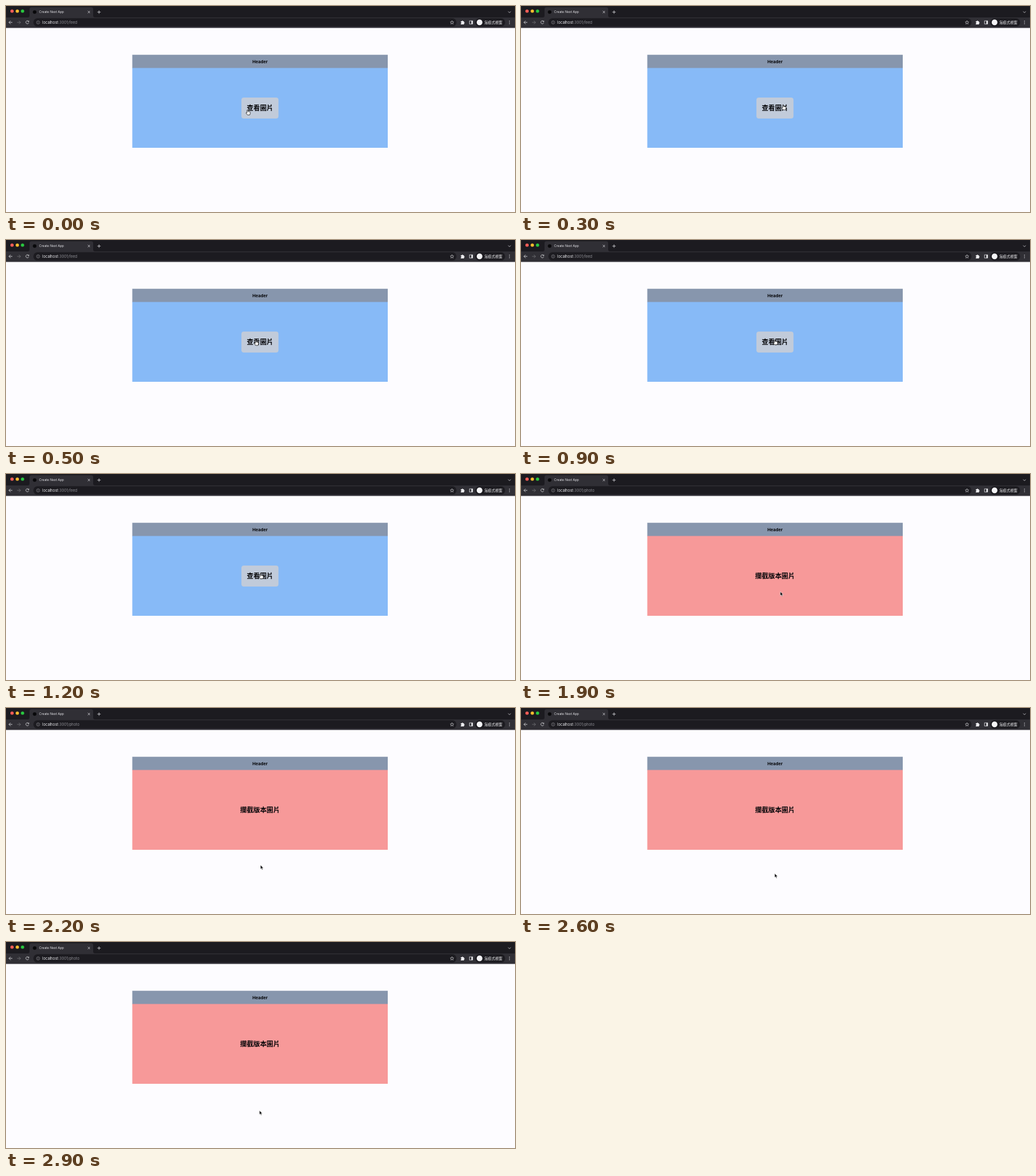
An HTML page that plays this animation: 800 px wide and 324 px high, repeating every 3000 ms.

```html
<!DOCTYPE html>
<html lang="en">
<head>
<meta charset="utf-8">
<title>Feed and photo</title>
<style>
html, body { margin: 0; width: 100%; height: 100%; overflow: hidden; background: #fdfcff; }
svg { display: block; width: 800px; height: 324px; font-family: Inter, "Noto Sans CJK TC", "Noto Sans CJK", sans-serif; }
.line { fill: none; stroke: #d8d8dc; stroke-width: .8; }
.center { text-anchor: middle; font-weight: 700; fill: #050508; }
.title { font-size: 10.4px; font-family: "Noto Sans CJK TC", "Noto Sans CJK", sans-serif; }
</style>
</head>
<body>
<svg viewBox="0 0 800 324">
  <!-- tab strip -->
  <rect width="800" height="18" fill="#1c1b20"/>
  <circle cx="9.5" cy="8" r="2.6" fill="#fb5d57"/>
  <circle cx="17.8" cy="8" r="2.6" fill="#fbbd2e"/>
  <circle cx="26" cy="8" r="2.6" fill="#29c840"/>
  <path d="M34 18q3 0 3-3V5q0-3 3-3h94q3 0 3 3v10q0 3 3 3z" fill="#302f35"/>
  <circle cx="45" cy="9.5" r="2.8" fill="#08080a"/>
  <text x="52" y="11.4" font-size="5" fill="#e6e6ea">Create Next App</text>
  <path class="line" d="M128.6 7.8l3.4 3.4m0-3.4l-3.4 3.4M143.6 9.6h5.2m-2.6-2.6v5.2M789.3 8.6l2 2 2-2"/>

  <!-- toolbar -->
  <rect y="18" width="800" height="16.5" fill="#302f35"/>
  <rect x="43" y="19.3" width="665" height="13" rx="6.5" fill="#1c1b20"/>
  <rect x="737.5" y="19.3" width="47" height="13" rx="6.5" fill="#1c1b20"/>
  <path class="line" d="M10 25.8H4.6m2.6-2.6l-2.6 2.6 2.6 2.6M35.6 24.3a2.4 2.4 0 1 0 .2 2.2m.1-3.4v1.7h-1.8"/>
  <path class="line" d="M17.5 25.8h5.4m-2.6-2.6l2.6 2.6-2.6 2.6" style="stroke:#717176"/>
  <g fill="none" stroke="#9a9aa0" stroke-width=".6">
    <circle cx="50.5" cy="25.8" r="2.5"/>
    <path d="M50.5 25.4v1.7m0-2.9v.6"/>
  </g>
  <text x="57" y="27.7" font-size="5.9" fill="#ededf0">localhost<tspan fill="#8e8e94">:3001/<tspan id="route"></tspan></tspan></text>
  <path class="line" style="stroke-width:.6" d="M701 23l.8 1.9 2 .2-1.5 1.3.5 2-1.8-1.1-1.8 1.1.5-2-1.5-1.3 2-.2z"/>
  <path fill="#ededf0" d="M714.8 24h1.6a1 1 0 0 1 2 0h1.4v1.5a1 1 0 0 1 0 2v1.4h-5v-1.5a.9.9 0 0 0 0-1.8z"/>
  <path class="line" d="M728.4 23.3h5v5h-5z"/>
  <path fill="#ededf0" d="M731.4 23.3h2v5h-2z"/>
  <circle cx="744.3" cy="25.8" r="4.5" fill="#f4f4f6"/>
  <text x="752" y="27.9" font-size="5.6" fill="#f4f4f6">無痕式視窗</text>
  <g fill="#d8d8dc">
    <circle cx="791.3" cy="23.7" r=".6"/><circle cx="791.3" cy="25.8" r=".6"/><circle cx="791.3" cy="27.9" r=".6"/>
  </g>

  <!-- page -->
  <rect id="panel" x="198.5" y="97" width="401.5" height="126"/>
  <rect x="198.5" y="76.7" width="401.5" height="20.8" fill="#8796ad"/>
  <text class="center" x="399.2" y="89.5" font-size="6.7">Header</text>
  <rect id="button" x="370" y="144" width="58.3" height="33" rx="4" fill="#c1cbda"/>
  <text id="title" class="center title" x="399.2" y="164"></text>

  <!-- pointers, each with its hot spot at 0,0 -->
  <g id="hand">
    <path fill="#fff" stroke="#111" stroke-width=".7" stroke-linejoin="round"
      d="M-.7.7Q0-.4.7.7V3q.8-.5 1.3.2.8-.4 1.3.3 1.1-.3 1.2.8V6Q4.3 7.3 3.6 8.3H-.1Q-1-.3-2.6 5-2.6 3.8-.7 5z" style="display:none"/>
    <path fill="#fff" stroke="#111" stroke-width=".7" stroke-linejoin="round"
      d="M-.7.8Q0-.3.7.8V3q.8-.5 1.3.2.8-.4 1.3.3 1.1-.2 1.1.8V6L3.6 8.3H0L-2.4 5.2Q-2.2 4-.7 5.2z"/>
  </g>
  <path id="beam" fill="none" stroke="#222" stroke-width=".6" d="M-1.3-4Q0-4 0-3.2V3.2Q0 4-1.3 4M1.3-4Q0-4 0-3.2M0 3.2Q0 4 1.3 4"/>
  <path id="arrow" fill="#050508" stroke="#fff" stroke-width=".5" d="M0 0V6.4L1.5 5.1 2.5 7.5 3.6 7 2.6 4.7H4.6z"/>
</svg>
<script>
const $ = id => document.getElementById(id);
const LOOP = 3000, STEP = 100, OPEN_AT = 1300, LEAVE_AT = 1900;

// pointer path: time, x, y
const path = [
  [0, 379.5, 163], [300, 412, 155], [500, 392.5, 157.5], [700, 398, 156.5], [1200, 400, 156.5],
  [1300, 399.3, 158.5], [1800, 399.3, 158.5], [1900, 407.5, 185], [2200, 400, 247],
  [2400, 399, 257], [2900, 398.3, 265], [3000, 398.3, 265]
];

function pointerAt(t) {
  const i = path.findIndex(p => p[0] > t);
  const [t0, x0, y0] = path[i - 1], [t1, x1, y1] = path[i];
  const k = (t - t0) / (t1 - t0);
  return [x0 + (x1 - x0) * k, y0 + (y1 - y0) * k];
}

function draw(now) {
  const t = Math.floor(now % LOOP / STEP) * STEP;
  const opened = t >= OPEN_AT;
  $('route').textContent = opened ? 'photo' : 'feed';
  $('title').textContent = opened ? '攔截版本圖片' : '查看圖片';
  $('panel').setAttribute('fill', opened ? '#f79999' : '#87baf7');
  $('button').style.display = opened ? 'none' : '';

  const shape = !opened ? 'hand' : t < LEAVE_AT ? 'beam' : 'arrow';
  for (const id of ['hand', 'beam', 'arrow']) $(id).style.display = id === shape ? '' : 'none';
  $(shape).setAttribute('transform', `translate(${pointerAt(t)})`);
  requestAnimationFrame(draw);
}
requestAnimationFrame(draw);
</script>
</body>
</html>
```
